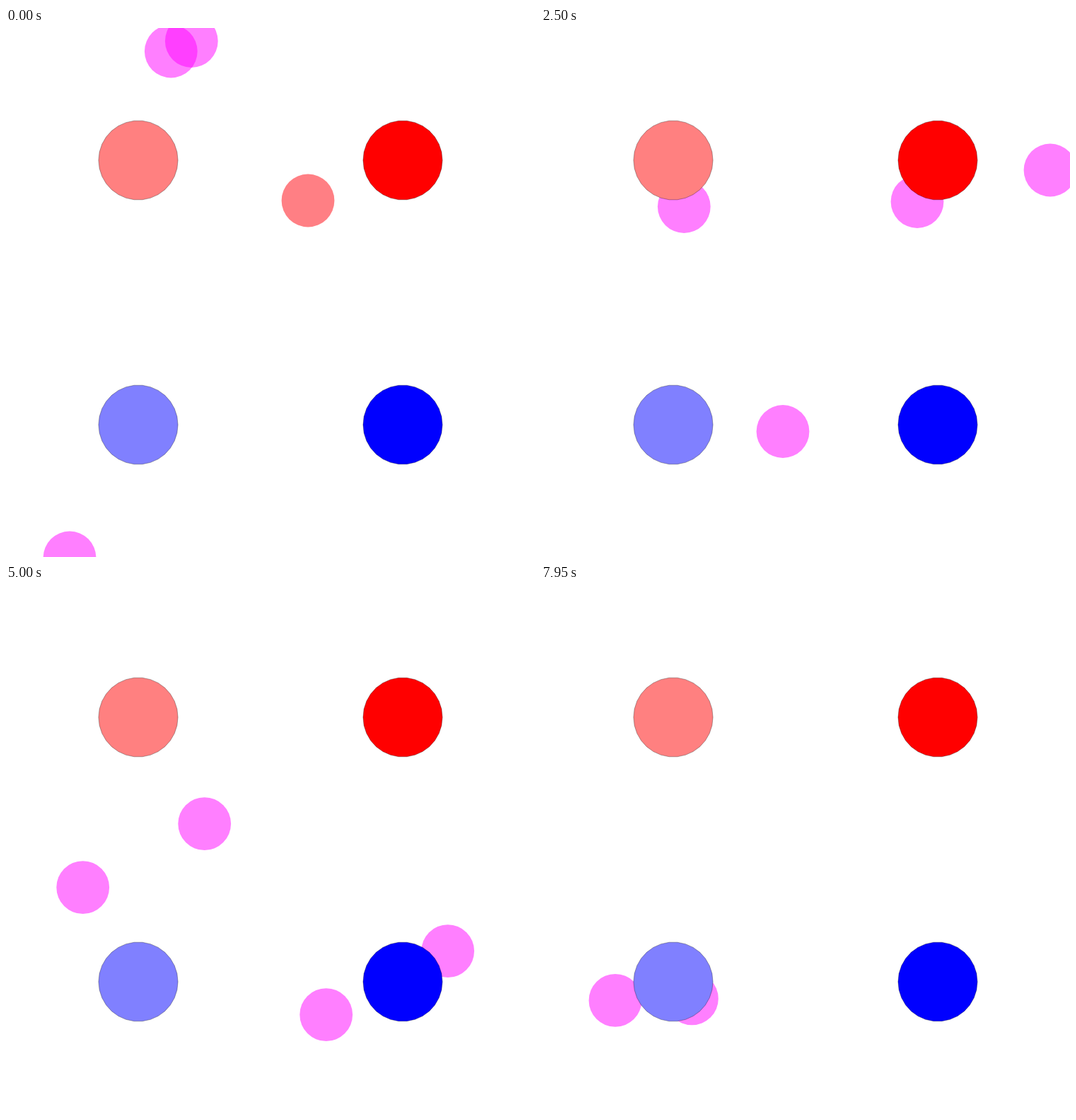
These frames come from a looping animation (748x748 px, 8 s). An HTML page with a canvas:

```html
<!DOCTYPE html>
<html lang="en">
<head>
<meta charset="utf-8">
<title>Falling discs</title>
<style>
html, body { margin: 0; width: 100%; height: 100%; overflow: hidden; background: #fff; }
canvas { display: block; width: 748px; height: 748px; }
</style>
</head>
<body>
<canvas id="stage" width="748" height="748"></canvas>
<script>
const ctx = document.getElementById('stage').getContext('2d');
const SIZE = 748, LOOP = 8000, STEP = 50, BURST = 2500;
const DISC_R = SIZE * 0.075, BALL_R = SIZE * 0.05, SIDES = 30;
const ACCEL = SIZE / 400, SPEED = 57.52 - 9 * ACCEL; // pixels per step
const MAGENTA = 'rgba(255,0,255,.5)', RED = 'rgba(255,0,10,.5)';

const ball = (x, y, color = MAGENTA) => ({ x, y, color });

// Key points: where the balls of each burst appear
const bursts = [
  [ball(233.3, 33), ball(262.3, 18.5), ball(90, 749), ball(427, 244, RED)],
  [ball(202.3, 252.5), ball(532, 245.5), ball(720, 201), ball(342, 570.5)],
  Array.from({ length: 4 }, (_, i) => ball(108.7 + 172 * i, 337.6 + 90 * ((3 * i + 1) % 4))),
  [ball(105, 69.7), ball(213.4, 67.2), ball(674.3, 606.4), ball(238.2, 588.8)],
];

function drawBall({ x, y, color }, fall) {
  ctx.beginPath();
  ctx.arc(x, y + fall, BALL_R, 0, 2 * Math.PI);
  ctx.fillStyle = color;
  ctx.fill();
}

function drawDisc(x, y, fill) {
  ctx.beginPath();
  for (let i = 0; i < SIDES; i++) {
    const a = i * 2 * Math.PI / SIDES;
    ctx.lineTo(x + DISC_R * Math.cos(a), y + DISC_R * Math.sin(a));
  }
  ctx.closePath();
  ctx.fillStyle = fill;
  ctx.fill();
  ctx.lineWidth = 0.7;
  ctx.strokeStyle = 'rgba(0,0,0,.45)';
  ctx.stroke();
}

// Red above blue, pale on the left, full on the right
function drawDiscs() {
  ['0', '240'].forEach((hue, row) => {
    [75, 50].forEach((light, col) => {
      drawDisc(SIZE * (1 + 2 * col) / 4, SIZE * (1 + 2 * row) / 4, `hsl(${hue},100%,${light}%)`);
    });
  });
}

function draw(time) {
  const t = time % LOOP;
  const n = Math.floor((t % BURST) / STEP);
  const fall = SPEED * n + ACCEL * n * n;
  ctx.fillStyle = '#fff';
  ctx.fillRect(0, 0, SIZE, SIZE);
  for (const b of bursts[Math.floor(t / BURST)]) drawBall(b, fall);
  drawDiscs();
}

const start = performance.now();
function tick() {
  draw(performance.now() - start);
  requestAnimationFrame(tick);
}
tick();
</script>
</body>
</html>
```
